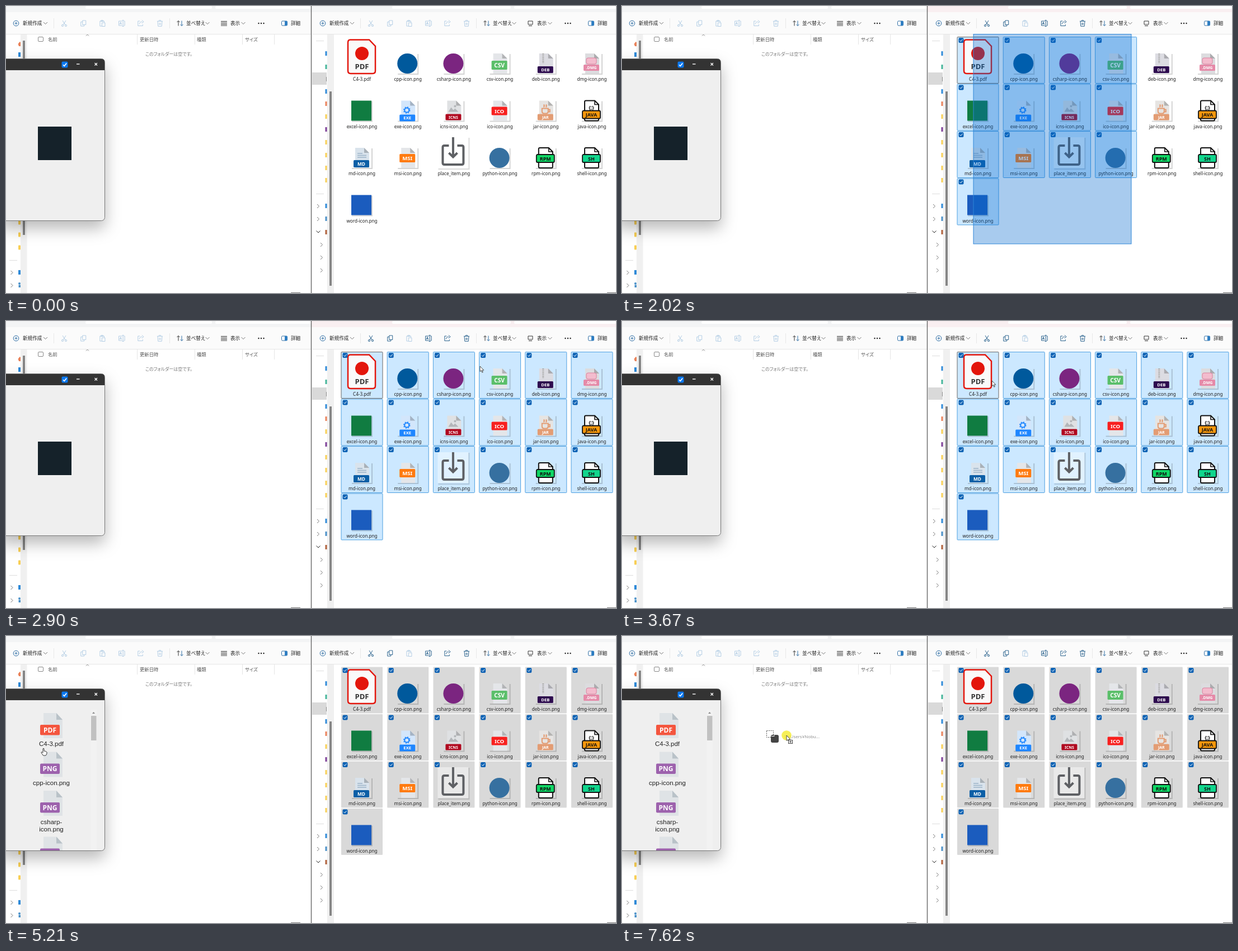
Write an HTML page that moves like this. It is 1090x514 px and loops after 8000 ms.

```html
<!DOCTYPE html>
<html lang="ja">
<head>
<meta charset="utf-8">
<title>Drag files between folders</title>
<style>
html, body { margin: 0; width: 100%; height: 100%; overflow: hidden; background: #fff; }
svg { display: block; }
text { font-family: "Noto Sans", "Noto Sans CJK JP", sans-serif; }
.ja { font-family: "Noto Sans CJK JP", sans-serif; font-feature-settings: "palt"; }
.list { font-family: "Liberation Sans", Arial, sans-serif; }
.mid { text-anchor: middle; }
.bold { font-weight: 700; }
</style>
</head>
<body>
<svg id="stage" width="1090" height="514" viewBox="0 0 1090 514"></svg>
<script>
const LOOP = 8000, STEP = 109.7;

// Markup helpers
const rect = (x, y, w, h, fill, more = '') =>
  `<rect x="${x}" y="${y}" width="${w}" height="${h}" fill="${fill}" ${more}/>`;
const circle = (x, y, r, fill, more = '') =>
  `<circle cx="${x}" cy="${y}" r="${r}" fill="${fill}" ${more}/>`;
const shape = (d, fill, more = '') => `<path d="${d}" fill="${fill}" ${more}/>`;
const line = (d, color, w = 1, more = '') =>
  shape(d, 'none', `stroke="${color}" stroke-width="${w}" ${more}`);
const text = (x, y, s, size, fill, cls = '') =>
  `<text x="${x}" y="${y}" font-size="${size}" fill="${fill}" class="${cls}">${s}</text>`;
const at = (x, y, body, more = '') => `<g transform="translate(${x} ${y})" ${more}>${body}</g>`;
const chevron = (x, y, turn, color = '#777') =>
  line('M-2 -3.5L1.5 0L-2 3.5', color, 1, `transform="translate(${x} ${y}) rotate(${turn})"`);

// Toolbar
const tools = [
  'M-3 -5L2 3M3 -5L-2 3M-4.6 4a1.6 1.6 0 1 0 3.2 0a1.6 1.6 0 1 0 -3.2 0M1.4 4a1.6 1.6 0 1 0 3.2 0a1.6 1.6 0 1 0 -3.2 0',
  'M-1.5 -5h6v7.5h-6zM-1.5 -2.5h-3v7.5h6v-2.5',
  'M-1.5 5h-3v-9h7.5v2.5M-1 -1h5.5v6.5h-5.5zM-2.5 -5.3h3.5v2h-3.5z',
  'M1 -4h-6v8h6M4 -4h1.5v8h-1.5M1 -5.5h3M2.5 -5.5v11M1 5.5h3M-3.5 2.2L-1.7 -2.3L0 2.2M-2.8 .8h2.2',
  'M-1.5 -4h-3.5v8.5h8.5v-2.5M-2.5 1.5c.3 -3 2 -4.3 5 -4.3M2 -5.5l3.3 2.7l-3.3 2.7',
  'M-5 -3.7h10M-4 -3.7l.8 9h6.4l.8 -9M-1.6 -3.7v-1.6h3.2v1.6M-1 -1v4M1 -1v4'
];
function toolbar(x, id, viewIcon) {
  const icon = i => line(tools[i], 'currentColor', 1, `transform="translate(${104 + 34.2 * i} 31)"`);
  return at(x, 0,
    rect(0, 11, 545, 39, '#fbfbfb') + line('M0 50.5H545', '#e6e6e6') +
    circle(18, 31, 4.8, 'none', 'stroke="#2f6ea5"') + line('M15.5 31h5M18 28.5v5', '#2f6ea5') +
    text(30, 34.2, '新規作成', 8.6, '#222', 'ja') + chevron(70.5, 31, 90) +
    line('M85.5 22v18M292.5 22v18', '#e8e8e8') +
    `<g id="${id}" color="#b4cee5">${[0, 1, 3, 4, 5].map(icon).join('')}</g>` +
    `<g color="#b4cee5">${icon(2)}</g>` +
    line('M308 35.500v-9l-2.500 2.500M308 26.500l2.500 2.500', '#333') +
    line('M314 26.500v9l-2.500 -2.500M314 35.500l2.500 -2.500', '#2f6ea5') +
    text(322, 34.2, '並べ替え', 8.6, '#222', 'ja') + chevron(360, 31, 90) +
    line(viewIcon, '#333') + text(401, 34.2, '表示', 8.6, '#222', 'ja') + chevron(424, 31, 90) +
    [451.5, 456, 460.500].map(v => circle(v, 31, 1.2, '#222')).join('') +
    rect(492.500, 27, 10, 8, '#fff', 'rx="1.5" stroke="#2f6ea5"') + rect(498, 27, 4.500, 8, '#2f7fc4') +
    text(509, 34.2, '詳細', 8.6, '#222', 'ja'));
}

// Left folder
const folder = (x, y) => rect(x, y - 3.5, 4, 8, '#f8cf55', 'rx="1"');
const left = () =>
  rect(0, 0, 545, 11, '#f3f4f5') + rect(142, 0, 226, 5, '#fff', 'rx="2"') + rect(374, 0, 171, 5, '#fff', 'rx="2"') +
  toolbar(0, 'toolsL', 'M384 27.5h11M384 30h11M384 32.500h11M384 35h11') +
  rect(26, 51, 11.5, 463, '#f0f0f0') + rect(30, 62, 4, 348, '#868686') +
  shape('M21.500 68l3 -4l1.500 1v7h-3z', '#e9825a') + rect(22, 83, 4, 8, '#2f8ad8') +
  [387, 409, 432].map(y => folder(22, y)).join('') +
  line('M6 455.5h14', '#ddd') + chevron(10.500, 477.5, 0) + chevron(10.500, 500.5, 0) +
  rect(22, 473, 4, 8, '#2f8ad8') + circle(24, 497, 2, '#4a90c8') + rect(22.500, 499.5, 3.500, 4.500, '#4a90c8') +
  rect(57.5, 55.5, 9, 8, '#fff', 'rx="1.500" stroke="#888"') + line('M143 53.5l2.500 -2.500l2.500 2.500', '#888') +
  [[75, '名前'], [239, '更新日時'], [341, '種類'], [427, 'サイズ']]
    .map(([x, s]) => text(x, 62.6, s, 8.4, '#555', 'ja')).join('') +
  line('M234.5 51v18M337.5 51v18M422.5 51v18M479.5 51v18', '#e5e5e5') +
  text(291, 88.500, 'このフォルダーは空です。', 8, '#777', 'ja mid') +
  rect(509, 513, 17, 1, '#777');

// Stacking application window
const page = (y, label, color) => at(81, y,
  shape('M-14 0H9L20 12V45H-14z', '#dfe3e6') + shape('M9 0V12H20z', '#b9c2c8') +
  rect(-20, 21, 35, 18.5, color, 'rx="2"') + text(-2.5, 34.5, label, 12, '#fff', 'mid bold'));
const label = (y, s) => text(81, y, s, 11.5, '#222', 'list mid');
const app = () =>
  `<g style="filter:drop-shadow(0 13px 14px rgba(0,0,0,.28))">` +
  rect(-12, 94.5, 188.500, 290, '#efefef', 'rx="6" stroke="#777"') + '</g>' +
  shape('M0 95H171q5 0 5 5V115H0z', '#333') +
  rect(99.5, 99.5, 11, 11, '#0a78f0', 'rx="2"') + line('M102 105.2l2.200 2.300l4 -5', '#fff', 1.6) +
  line('M126 104h5.500', '#fff', 1.4) + line('M158.500 102l4.500 4.500M163 102l-4.500 4.500', '#fff', 1.3) +
  rect(57, 216, 60, 60, '#15222a', 'id="mark"') +
  `<clipPath id="body"><rect y="115" width="176" height="269"/></clipPath>` +
  `<g id="files" clip-path="url(#body)">` +
  page(138, 'PDF', '#f4553e') + label(197, 'C4-3.pdf') +
  page(207.500, 'PNG', '#9d62ad') + label(267, 'cpp-icon.png') +
  page(277, 'PNG', '#9d62ad') + label(336.500, 'csharp-') + label(349.500, 'icon.png') +
  page(359.500, 'PNG', '#9d62ad') +
  rect(151, 132, 11, 252, '#f2f2f2') + rect(152, 143, 9.500, 44, '#c1c1c1') +
  shape('M154 139l2.500 -3l2.500 3z', '#888') + '</g>';

// File icons, centred on 0,0
const lines = (d, c) => line(d, c, 1.3);
const tag = (s, x, y, w, h, fill, ink) => rect(x, y, w, h, fill, 'rx="1.500"') +
  text(x + w / 2, y + h * .74, s, h * .64, ink, 'mid bold');
const doc = (s, color, y, h, paper = '#e4e6e9', more = '') =>
  shape('M-11 -18H5L14 -9V18H-11z', paper) + shape('M5 -18V-9H14z', 'rgba(0,0,0,.22)') +
  more + tag(s, -14, y, 28, h, color, '#fff');
const outlined = (s, color, y, more = '') =>
  shape('M-12 -16q0 -2 2 -2H6L13 -11V16q0 2 -2 2H-10q-2 0 -2 -2z', '#fff', 'stroke="#111" stroke-width="2"') +
  line('M6 -18V-11H13', '#111', 1.600) + more + rect(-16, y, 32, 14, color, 'rx="2" stroke="#111" stroke-width="1.800"') +
  text(0, y + 10.5, s, 9, '#111', 'mid bold');
const gear = circle(-1, -1, 4, 'none', 'stroke="#1e86ff" stroke-width="2"') +
  circle(-1, -1, 5.600, 'none', 'stroke="#1e86ff" stroke-width="1.400" stroke-dasharray="2.200 2.200"');
const cup = line('M-6 -4H5V1q0 4 -4 4H-2q-4 0 -4 -4zM5 -2h3v4h-3M-3 -11q2 2 0 5M1 -11q2 2 0 5', '#e39c73', 2);
const pdf = at(0, -12,
  shape('M-20 -30.500H14L25 -19V25q0 5 -5 5H-19q-5 0 -5 -5V-25.500q0 -5 4 -5z', '#fafafa', 'stroke="#e3160c" stroke-width="2.500"') +
  circle(1, -6, 12, '#e3160c') + text(1, 22, 'PDF', 13, '#333', 'mid bold'));
const place = at(0, -9,
  rect(-28, -28, 55, 55, 'rgba(255,255,255,.4)') + shape('M27 -27h2v57h-56v-2h54z', 'rgba(0,0,0,.14)') +
  line('M-8 -13H-16q-3 0 -3 3V18q0 3 3 3H15q3 0 3 -3V-10q0 -3 -3 -3H7', '#5e6064', 4) +
  line('M-.5 -28V7M-8 0L-.5 7.500L7 0', '#5e6064', 4));

const items = [
  ['C4-3.pdf', pdf],
  ['cpp-icon.png', circle(0, 0, 18, '#00599c')],
  ['csharp-icon.png', circle(0, 0, 18, '#7b2580')],
  ['csv-icon.png', doc('CSV', '#5bbf6a', -5, 16)],
  ['deb-icon.png', doc('DEB', '#2e0c4f', 5, 12, '#dcdce2', line('M-4 -18V0', '#aaa', 3, 'stroke-dasharray="2 1.500"'))],
  ['dmg-icon.png', doc('.DMG', '#e58aa8', 2, 11, '#dcdcdf', rect(-9, -10, 18, 11, '#f3bccd', 'rx="3" stroke="#d9809d"'))],
  ['excel-icon.png', rect(-18, -18, 36, 36, '#107c41')],
  ['exe-icon.png', doc('EXE', '#1e86ff', 7, 12, '#d3e6fb', gear)],
  ['icns-icon.png', doc('ICNS', '#b0091f', 6, 11, '#dfe1e3', shape('M-9 2L-4 -6L0 -1L3 -4L9 2z', '#b3b6b9') + circle(3, -8, 2, '#b3b6b9'))],
  ['ico-icon.png', doc('ICO', '#f8201f', -7, 15)],
  ['jar-icon.png', doc('JAR', '#e39c73', 6, 11, '#e6e4e2', cup)],
  ['java-icon.png', outlined('JAVA', '#f8980c', 0, text(0, -3, '{;}', 9, '#111', 'mid bold'))],
  ['md-icon.png', doc('MD', '#0c5fa6', 4, 13, '#d9e3ec', lines('M-7 -8H2M-7 -4.500H9M-7 -1H9', '#9cb4c8'))],
  ['msi-icon.png', doc('MSI', '#ff7b10', -7, 15)],
  ['place_item.png', place],
  ['python-icon.png', circle(0, 0, 18, '#3670a0')],
  ['rpm-icon.png', outlined('RPM', '#0fd765', -6)],
  ['shell-icon.png', outlined('SH', '#10d58c', -6)],
  ['word-icon.png', rect(-18, -18, 36, 36, '#1b5cbe')]
].map(([name, icon], i) =>
  ({ name, icon, x: 599 + 82.2 * (i % 6), y: 55.5 + 84.5 * Math.floor(i / 6) }));

const cell = ({ name, icon, x, y }, i) => at(x, y,
  rect(0, 0, 74, 83, '#cce8ff', `class="cell" rx="1" stroke="${i ? '#4d9fe0' : '#666'}"`) +
  (icon === pdf || icon === place ? '' : shape('M18 -17h2v37h-37v-2h35z', 'rgba(0,0,0,.17)', 'transform="translate(36 47.500)"')) +
  at(36, 47.500, icon) + text(37, 78.500, name, 8.1, '#222', 'mid') +
  at(2.500, 1.500, rect(0, 0, 9, 9, '#0c62b4', 'rx="2"') + line('M2 4.500l2 2l3 -4', '#fff'), 'class="check"'));

// Right folder
const side = [[85, '#2f8ad8'], [109, '#45b59a'], [153, '#2f8ad8'], [175, '#e9825a'], [198, '#f8cf55'],
  [221, '#7d3f98'], [244, '#f8cf55'], [267, '#f8cf55'], [290, '#f8cf55'], [312, '#f8cf55'], [358, '#2f8ad8'], [381, '#4a90c8'], [405, '#b0603a']];
const right = () =>
  rect(545, 0, 545, 514, '#fff') +
  rect(545, 0, 545, 11, '#f3f4f5', 'id="strip"') + rect(690, 0, 212, 5, '#fff', 'rx="2"') + rect(908, 0, 182, 5, '#fff', 'rx="2"') +
  toolbar(548, 'toolsR', 'M385 27h8v6h-8zM386 35.500h6') +
  rect(547, 119, 26, 22, '#d9d9d9') + line('M572.500 127v8', '#888') +
  rect(574, 51, 12, 463, '#f0f0f0') + rect(578, 153, 4, 348, '#868686') +
  side.map(([y, c]) => rect(570.500, y - 4, 3, 8, c)).join('') +
  line('M554 62.500h14M554 336.500h14', '#ddd') +
  [358.500, 381.500].map(y => chevron(558, y, 0)).join('') + chevron(558, 404.500, 90, '#222') +
  [427.500, 450.500, 473.500].map(y => chevron(564, y, 0)).join('') +
  items.map(cell).join('') +
  line('M545.500 0V514', '#666', 1.400) + rect(1074, 513, 16, 1, '#777');

// Moving parts
const overlay =
  rect(0, 0, 0, 0, 'rgba(0,102,204,.34)', 'id="band" stroke="#2f86d8"') +
  '<g id="drag">' + rect(-1.500, -1.500, 72.500, 72.500, '#fff', 'rx="3" stroke="#222"') +
  '<g id="tip">' + rect(8.500, 9.500, 36, 14, '#fafafa', 'stroke="#e2e2e2"') +
  line('M12 16.500h7M15.500 13v7', '#333') + text(23, 19.500, 'コピー', 7.500, '#2a5d94', 'ja') + '</g>' +
  rect(28, 28, 13, 13, '#0a6fc9') + text(34.500, 37.700, '19', 8, '#fff', 'mid') + '</g>' +
  '<g id="ghost">' + rect(-35.500, -8.500, 12, 12, '#fff', 'stroke="#555" stroke-dasharray="2 1.500"') +
  rect(-28, -1, 14, 14, '#444', 'rx="3"') + line('M-27 1.500h5v-2', '#fff') +
  text(-5, 5, 'C:¥Users¥Nobu...', 7.900, '#909090') + '</g>' +
  '<g id="pointer">' + circle(0, 0, 8.800, '#f5ec3c', 'id="halo" opacity=".85"') +
  shape('M0 0V9.500L2.200 7.600L3.800 11.200L5.300 10.500L3.700 7.100H6.800z', '#fff', 'id="arrow" stroke="#222" stroke-width=".8"') +
  shape('M-1 1q1 -2 2 0V5q4 0 5 2V9q0 2 -2 4H-.500L-4 8q0 -2 1.500 -1L-1 8z', '#fff', 'id="hand" stroke="#222" stroke-width=".9"') +
  '<g id="badge">' + rect(3.500, 8.500, 7, 6, '#fff', 'stroke="#444"') + line('M5 11.500h4M7 9.500v4', '#444') + '</g></g>';

const stage = document.getElementById('stage');
stage.innerHTML = left() + app() + right() + overlay;
const $ = id => document.getElementById(id);
const cells = [...stage.querySelectorAll('.cell')], checks = [...stage.querySelectorAll('.check')];
const show = (el, on) => el.setAttribute('visibility', on ? 'inherit' : 'hidden');
const move = (el, [x, y]) => el.setAttribute('transform', `translate(${x} ${y})`);

// Pointer path: time, x, y
const path = [
  [270, 829, 453], [490, 720, 440], [705, 628, 426], [1037, 628, 426], [1147, 633, 370], [1257, 637, 250],
  [1367, 640, 130], [1476, 642, 54], [1590, 642, 54], [1696, 646, 40], [2135, 998, 46], [2250, 998, 46],
  [2354, 1003, 70], [2464, 1005, 80], [2574, 1040, 86], [2683, 1040, 86], [3122, 655, 76], [3671, 661, 107],
  [4000, 658, 108], [4220, 658, 108], [4329, 635, 112], [4439, 450, 230], [4549, 250, 265], [4658, 120, 250],
  [4768, 80, 211], [5097, 67, 201], [5755, 67, 199], [6633, 114, 192], [6962, 114, 192], [7071, 128, 193], [7620, 294, 178]
];
function pointerAt(t) {
  const i = path.findIndex(p => p[0] > t);
  if (i < 1) return path[i ? path.length - 1 : 0].slice(1);
  const [a, b] = [path[i - 1], path[i]], k = (t - a[0]) / (b[0] - a[0]);
  return [1, 2].map(n => Math.round(a[n] + (b[n] - a[n]) * k));
}

function draw(now) {
  const raw = now % LOOP;
  const t = raw < 261 ? 0 : 270 + STEP * Math.floor((raw - 261) / STEP);
  const within = (a, b = LOOP) => t >= a && t < b;
  const pos = pointerAt(t), dropped = within(5200);

  const banding = within(1140, 2680), [bx, by] = pos;
  const top = Math.max(50.500, by);
  show($('band'), banding);
  const box = { x: 628, y: top, width: Math.max(0, bx - 628), height: Math.max(0, 426 - top) };
  for (const key in box) $('band').setAttribute(key, box[key]);

  items.forEach(({ x, y }, i) => {
    const on = banding ? x < bx && y + 83 > top : t >= 2680;
    show(cells[i], on);
    show(checks[i], on);
    cells[i].setAttribute('fill', dropped ? '#d9d9d9' : '#cce8ff');
    cells[i].setAttribute('stroke-opacity', dropped ? 0 : 1);
  });
  $('toolsR').setAttribute('color', within(1140) ? '#2c648f' : '#b4cee5');
  $('strip').setAttribute('fill', within(920, 5200) ? '#f9eff1' : '#f3f4f5');

  show($('mark'), !dropped);
  show($('files'), dropped);
  show($('drag'), within(4320, 5200));
  show($('tip'), false);
  if (within(4600, 5200)) show($('tip'), true);
  show($('ghost'), within(7170));
  show($('pointer'), t > 0 && by >= 50);
  show($('halo'), within(920, 2680) || within(3990, 5200) || within(6845));
  show($('hand'), within(5200, 7065));
  show($('arrow'), !within(5200, 7065));
  show($('badge'), within(7065));
  for (const id of ['drag', 'ghost', 'pointer']) move($(id), pos);
}

const start = performance.now();
function frame() {
  draw(performance.now() - start);
  requestAnimationFrame(frame);
}
frame();
</script>
</body>
</html>
```
